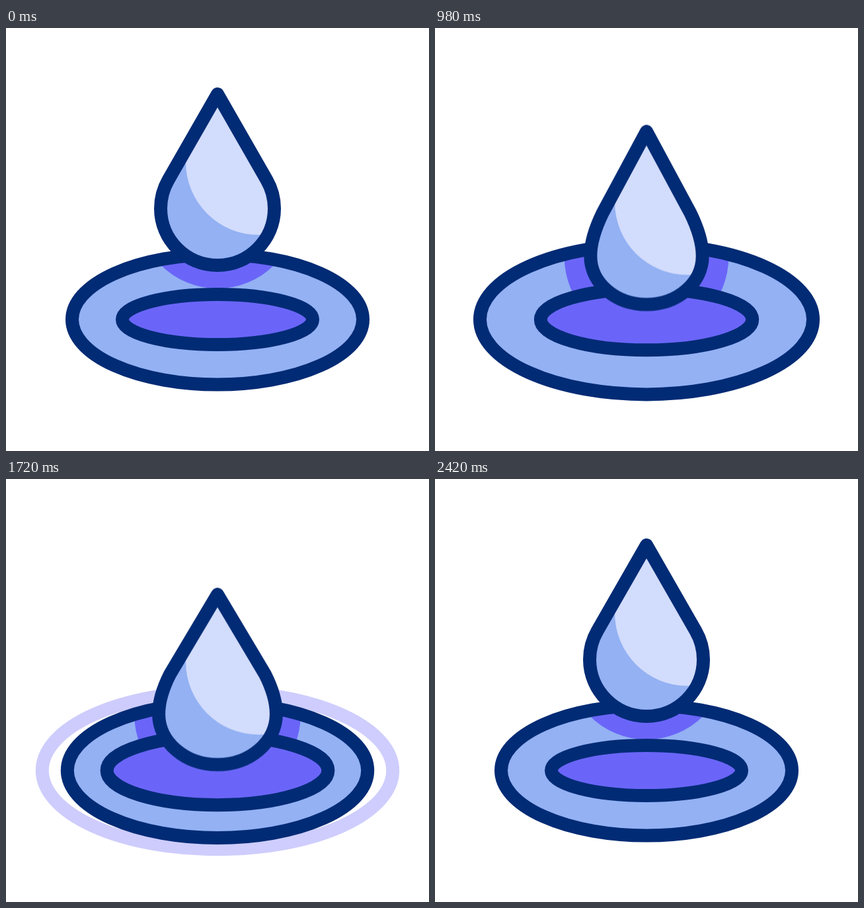
Write an HTML page without scripts that moves like this. It is 640 by 640 pixels and loops after 3 s.

```html
<!DOCTYPE html>
<html lang="en">
<head>
<meta charset="utf-8">
<title>Water drop</title>
<style>
html, body { margin: 0; width: 100%; height: 100%; overflow: hidden; background: #fff; }
svg { display: block; width: 100%; height: 100%; }

svg * { animation: 3s cubic-bezier(.364, 0, .636, 1) infinite; }
.line { stroke: #022b75; stroke-width: 20; stroke-linejoin: round; }
.outer { animation-name: outer; }
.inner { animation-name: inner; }
.wave { animation-name: wave, fade; animation-timing-function: cubic-bezier(.364, 0, .636, 1), linear; }
.fall { animation-name: fall; }
.drop { animation-name: drop; }
.shine { animation-name: shine; }
.shade { animation-name: shade; }

@keyframes outer {
  0%, 8.6%, 80.3%, 100% { rx: 220px; ry: 98.5px; }
  25.7% { rx: 277px; ry: 124.5px; }
  43.3%, 46.7% { rx: 204px; ry: 92px; }
  62.3% { rx: 234px; ry: 105px; }
}
@keyframes inner {
  0%, 6.7%, 80.3%, 100% { rx: 144px; ry: 38px; }
  20.7% { rx: 175px; ry: 54px; }
  43.3% { rx: 148px; ry: 40px; }
  54.7% { rx: 168px; ry: 52.6px; }
}
@keyframes wave {
  0%, 6.5% { rx: 220px; ry: 98.5px; }
  28.7% { rx: 319px; ry: 142.5px; }
  28.71%, 44.7% { rx: 204px; ry: 92px; }
  66.7%, 100% { rx: 303px; ry: 136px; }
}
@keyframes fade {
  0%, 6.49% { opacity: 0; }
  6.5% { opacity: .77; }
  28.7%, 44.69% { opacity: 0; }
  44.7% { opacity: .77; }
  66.7%, 100% { opacity: 0; }
}
@keyframes fall {
  0%, 7.2%, 80.3%, 100% { transform: translate(320px, 100px); }
  25%, 58.2% { transform: translate(320px, 175px); }
  43.3% { transform: translate(320px, 126px); }
}
/* Rest, stretched and squashed, measured from the tip */
@keyframes drop {
  0%, 11.3%, 80.3%, 100% {
    d: path("M0 0L74.5 130C82 143 86 158 86 173C86 220.5 47.5 259 0 259C-47.5 259 -86 220.5 -86 173C-86 158 -82 143 -74.5 130Z");
  }
  27.7%, 65.7% {
    d: path("M0 0L60 124C73 151 80.5 174 80.5 196C80.5 235 45 266 0 266C-45 266 -80.5 235 -80.5 196C-80.5 174 -73 151 -60 124Z");
  }
  43.3%, 48.3% {
    d: path("M0 0L85 116C92 128 98.5 146 98.5 164C98.5 210 54 248 0 248C-54 248 -98.5 210 -98.5 164C-98.5 146 -92 128 -85 116Z");
  }
}
@keyframes shine {
  0%, 11.3%, 80.3%, 100% { cy: 103px; }
  27.7%, 65.7% { cy: 112px; }
  43.3%, 48.3% { cy: 91px; }
}
@keyframes shade {
  0%, 11.3%, 80.3%, 100% { cy: 172px; r: 122px; }
  27.7%, 65.7% { cy: 197px; r: 123px; }
  43.3%, 48.3% { cy: 164px; r: 129px; }
}
</style>
</head>
<body>
<svg viewBox="0 0 640 640">
  <defs>
    <clipPath id="pool"><ellipse class="outer" cx="320" cy="441"/></clipPath>
    <clipPath id="body"><path class="drop"/></clipPath>
  </defs>

  <ellipse class="wave" cx="320" cy="441" fill="none" stroke="#6a65f8" stroke-width="20"/>
  <ellipse class="outer" cx="320" cy="441" fill="#93b1f3"/>
  <g clip-path="url(#pool)">
    <g class="fall"><circle class="shade" fill="#6a65f8"/></g>
  </g>
  <ellipse class="outer line" cx="320" cy="441" fill="none"/>
  <ellipse class="inner line" cx="320" cy="441" fill="#6a65f8"/>

  <g class="fall">
    <path class="drop" fill="#93b1f3"/>
    <g clip-path="url(#body)"><circle class="shine" cx="62" r="110" fill="#d2dcfc"/></g>
    <path class="drop line" fill="none"/>
  </g>
</svg>
</body>
</html>
```
